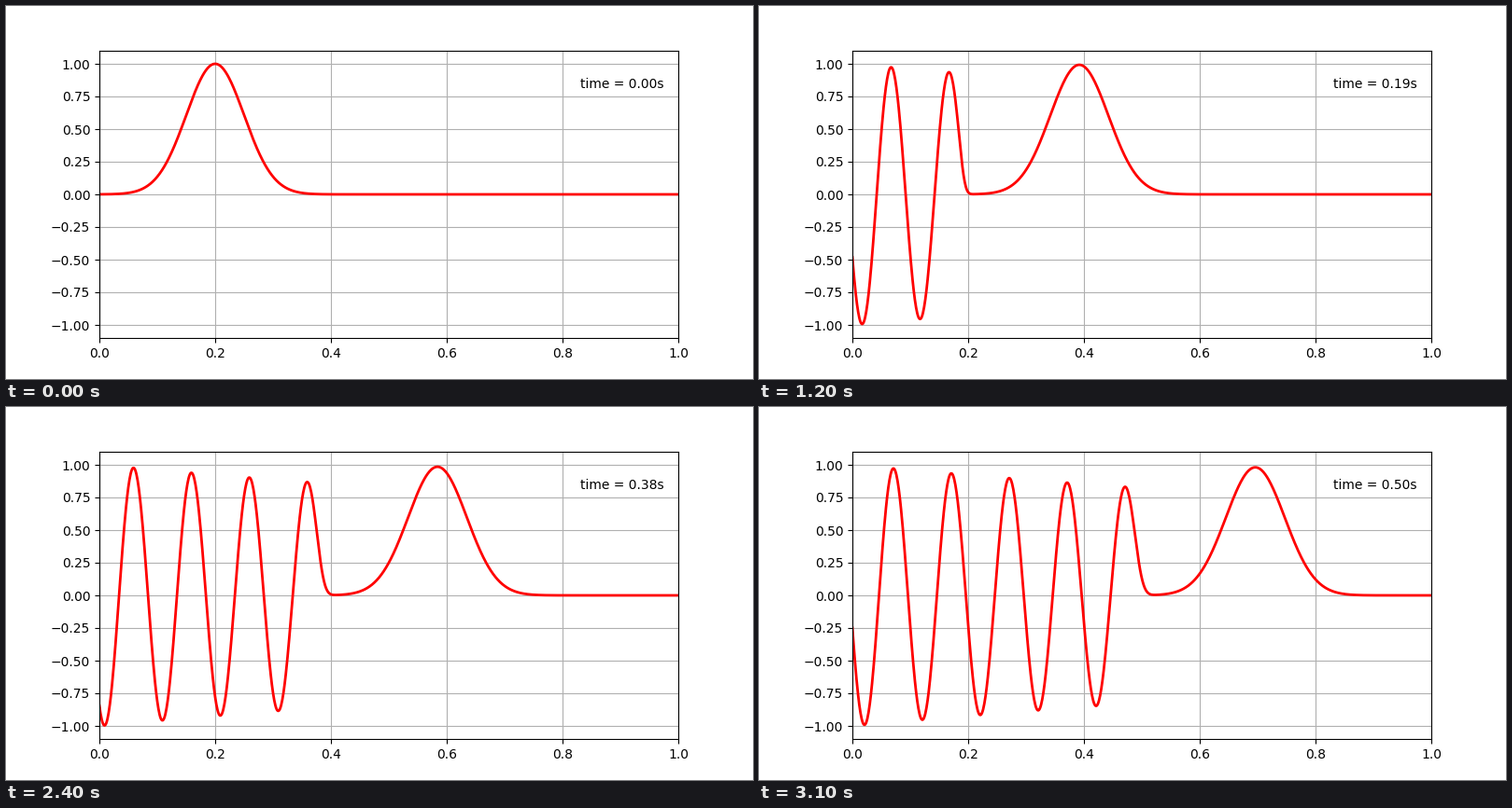
Write a matplotlib script that moves like this. It is 800 px wide and 400 px high and loops after 3.2 s.

```python
import numpy as np
import matplotlib.pyplot as plt
from matplotlib.animation import FuncAnimation

plt.rcParams["font.family"] = "DejaVu Sans"

FRAMES = 32
INTERVAL = 100
STEPS = 20              # solver steps per frame
SPEED = 1.0
DX = 0.001
CFL = 0.8
DT = CFL * DX / SPEED

x = np.linspace(0, 1, 1001)


def inflow(t):
    return np.sin(20 * np.pi * t)


def solve():
    """First-order upwind advection of a Gaussian with a sine inflow."""
    u = np.exp(-200 * (x - 0.2) ** 2)
    states = [u.copy()]
    for n in range(1, (FRAMES - 1) * STEPS + 1):
        u[1:] -= CFL * (u[1:] - u[:-1])
        u[0] = inflow(n * DT)
        if n % STEPS == 0:
            states.append(u.copy())
    return states


states = solve()

fig, ax = plt.subplots(figsize=(8, 4), dpi=100)
ax.set_xlim(0, 1)
ax.set_ylim(-1.1, 1.1)
ax.grid(True)
line, = ax.plot([], [], color="red", lw=2)
label = ax.text(0.83, 0.87, "", transform=ax.transAxes)


def draw(i):
    line.set_data(x, states[i])
    label.set_text(f"time = {i * STEPS * DT:.2f}s")
    return line, label


def init():
    return draw(0)


anim = FuncAnimation(fig, draw, frames=FRAMES, init_func=init,
                     interval=INTERVAL, repeat=True, repeat_delay=0)
plt.show()
```
